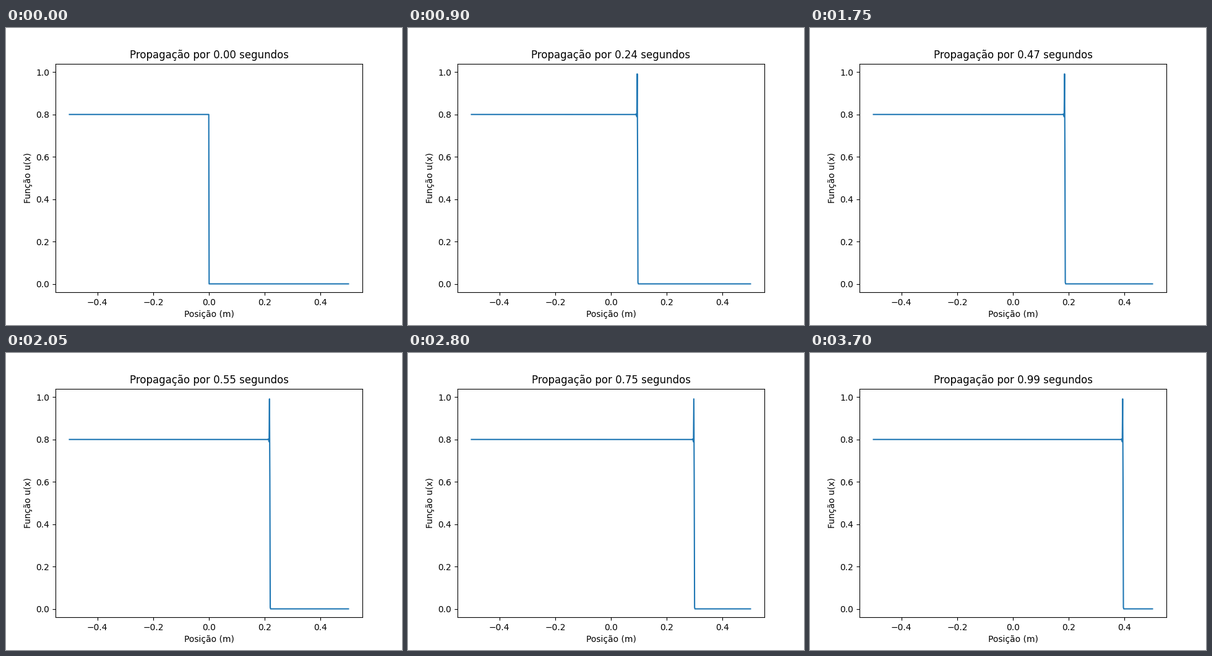
Recreate the animation shown at these times as a matplotlib script. Size 640 by 480 pixels, loop 3750 ms.

```python
import numpy as np
import matplotlib.pyplot as plt
from matplotlib.animation import FuncAnimation

POINTS = 750
STEPS_PER_FRAME = 10
FRAMES = 75
INTERVAL = 50  # ms

x = np.linspace(-0.5, 0.5, POINTS)
t = np.linspace(0, 1, POINTS)
ratio = (t[1] - t[0]) / (x[1] - x[0])


def flux(u):
    return u ** 2 / 2


def lax_wendroff(u):
    """Advance Burgers' equation by one two-step Lax-Wendroff step."""
    half = (u[1:] + u[:-1]) / 2 - ratio / 2 * np.diff(flux(u))
    new = u.copy()
    new[1:-1] -= ratio * np.diff(flux(half))
    return new


def solve():
    u = np.where(x < 0, 0.8, 0.0)
    states = [u]
    for _ in range(FRAMES - 1):
        for _ in range(STEPS_PER_FRAME):
            u = lax_wendroff(u)
        states.append(u)
    return states


states = solve()

fig, ax = plt.subplots(figsize=(6.4, 4.8), dpi=100)
line, = ax.plot(x, states[0])
ax.set_xlim(-0.55, 0.55)
ax.set_ylim(-0.04, 1.04)
ax.set_xlabel("Posição (m)")
ax.set_ylabel("Função u(x)")
title = ax.set_title("")


def draw(i):
    line.set_ydata(states[i])
    title.set_text(f"Propagação por {t[i * STEPS_PER_FRAME]:.2f} segundos")
    return line, title


anim = FuncAnimation(fig, draw, frames=FRAMES, interval=INTERVAL,
                     init_func=lambda: draw(0), repeat=True, repeat_delay=0)
plt.show()
```
